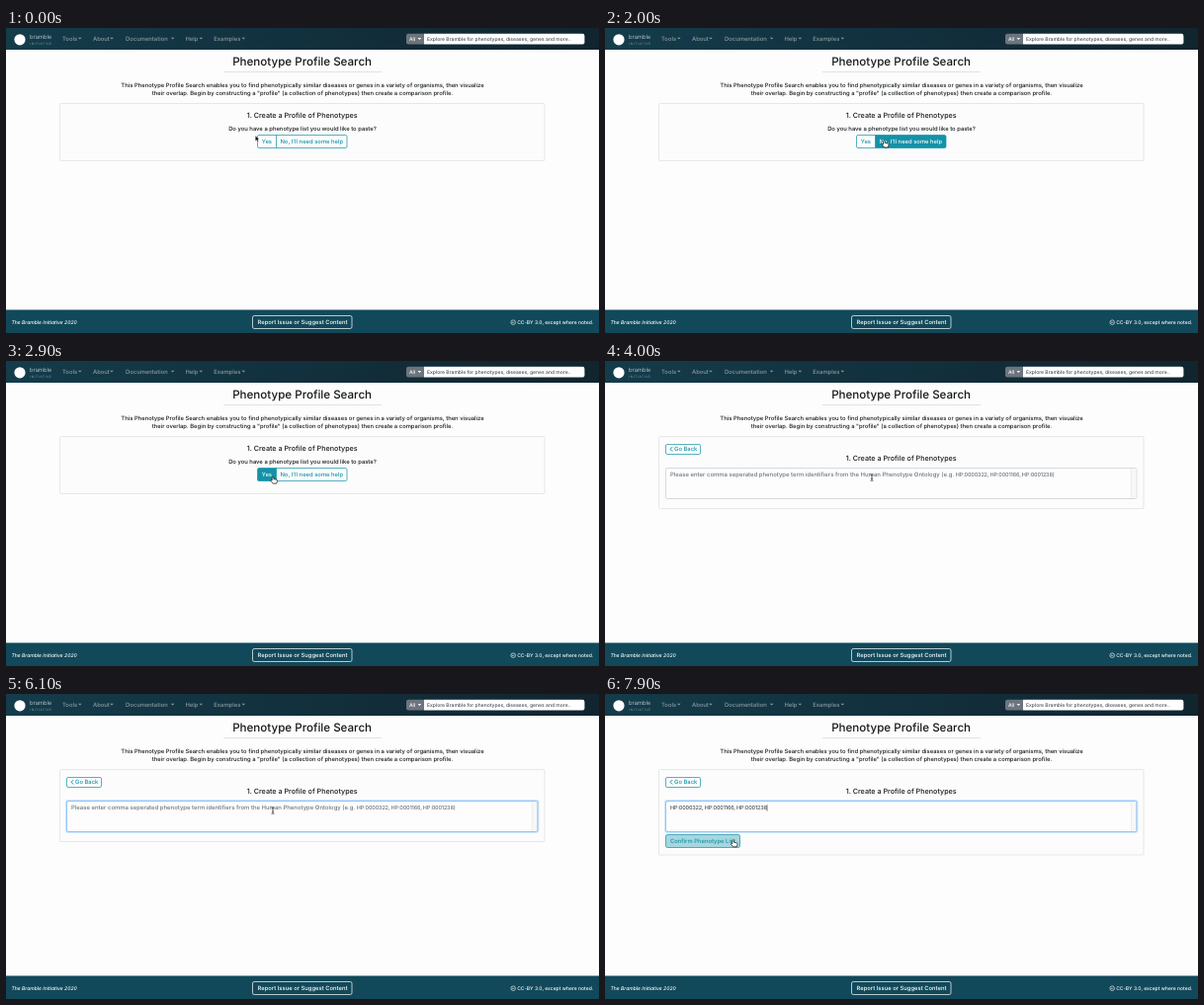
These frames come from a looping animation (600x309 px, 8000 ms). An HTML page:

```html
<!DOCTYPE html>
<html lang="en">
<head>
<meta charset="utf-8">
<title>Phenotype Profile Search</title>
<style>
  html, body { margin: 0; width: 100%; height: 100%; overflow: hidden; background: #fdfdfd; }
  svg { display: block; width: 100%; height: 100%; }
  text { font: 500 5.86px Inter, "Open Sans", sans-serif; fill: #15181b; white-space: pre; text-rendering: geometricPrecision; }
  .mid { text-anchor: middle; }
  .title { font-size: 11.6px; }
  .head { font-size: 7.2px; }
  .nav text { fill: #8b9ba2; }
  .small { font-size: 5.02px; }
  .white, .nav .white { fill: #fff; }
  .teal { fill: #1392a8; }
  .line { fill: none; stroke: #1392a8; stroke-opacity: .7; }
  .card { fill: #fcfcfc; stroke: #e7e7e8; }
  .ids { font-size: 5.5px; letter-spacing: -.17px; }
  .hint { fill: #6c757d; font-size: 5.96px; }
</style>
</head>
<body>
<svg viewBox="0 0 600 309" preserveAspectRatio="none">
  <defs>
    <linearGradient id="navFill" x2="1" y2="0">
      <stop stop-color="#143c4b"/><stop offset=".5" stop-color="#12303d"/><stop offset="1" stop-color="#11252f"/>
    </linearGradient>
  </defs>
  <rect width="600" height="309" fill="#fdfdfd"/>

  <g class="nav">
    <rect width="600" height="22" fill="url(#navFill)"/>
    <circle cx="14" cy="11.8" r="5.6" fill="#fff"/>
    <text x="24" y="11" style="fill:#dbe2e5;font-weight:300">bramble</text>
    <text x="24.3" y="16.6" style="fill:#6d909b;font-size:3.2px;letter-spacing:.6px">INITIATIVE</text>
    <g id="menu"></g>
    <path d="M423 5.8H407Q405 5.8 405 8V14.5Q405 16.6 407 16.6H423Z" fill="#6c757d"/>
    <path d="M423 5.8H583.5Q585.4 5.8 585.4 8V14.5Q585.4 16.6 583.5 16.6H423Z" fill="#fff"/>
    <text x="408" y="13" class="small white">All</text>
    <path d="M416.6 10.1h3.6l-1.8 1.8z" fill="#fff"/>
    <text x="426" y="13" class="small" style="fill:#495057">Explore Bramble for phenotypes, diseases, genes and more..</text>
  </g>

  <text class="mid title" x="299.6" y="38">Phenotype Profile Search</text>
  <path d="M220 44.5H380" stroke="#dcdcdc" stroke-width=".8"/>
  <text class="mid" x="300" y="59.5">This Phenotype Profile Search enables you to find phenotypically similar diseases or genes in a variety of organisms, then visualize</text>
  <text class="mid" x="300" y="68.1">their overlap. Begin by constructing a "profile" (a collection of phenotypes) then create a comparison profile.</text>

  <rect id="card" class="card" x="54.5" y="76.5" width="490.5" height="58" rx="1"/>
  <text id="head" class="mid head" x="299.7" y="90.8">1. Create a Profile of Phenotypes</text>

  <g id="ask">
    <text class="mid" x="300" y="103.7">Do you have a phenotype list you would like to paste?</text>
    <path class="teal" id="yesFill" d="M273.5 108.5H256Q254.5 108.5 254.5 110V120Q254.5 121.5 256 121.5H273.5Z"/>
    <path class="teal" id="noFill" d="M273.5 108.5H343.5Q345 108.5 345 110V120Q345 121.5 343.5 121.5H273.5Z"/>
    <rect class="line" x="254.5" y="108.5" width="90.5" height="13" rx="1.5"/>
    <path class="line" d="M273.5 108.5V121.5"/>
    <text class="mid teal" x="263.9" y="117">Yes</text>
    <text class="mid teal" x="309.3" y="117">No, I'll need some help</text>
    <text class="mid white" id="yesText" x="263.9" y="117">Yes</text>
    <text class="mid white" id="noText" x="309.3" y="117">No, I'll need some help</text>
  </g>

  <g id="form">
    <rect class="line" x="61.5" y="84.5" width="35" height="10" rx="1.4"/>
    <path class="line" d="M68.2 87.1L66 89.3L68.2 91.5" style="stroke-opacity:1"/>
    <text class="teal" x="70" y="91.4">Go Back</text>
    <rect id="ring" x="61" y="108" width="477.4" height="32" rx="2" fill="none" stroke="#cfe5fd" stroke-width="2"/>
    <rect x="61.5" y="108.5" width="476.4" height="31" rx="1.5" fill="#fdfdfd" stroke="#d5d9de"/>
    <path d="M532.4 109H537.4V139H532.4Z" fill="#f7f7f7"/>
    <path d="M532.4 109V139" stroke="#e6e6e6" stroke-width=".7"/>
    <rect id="edge" x="61.5" y="108.5" width="476.4" height="31" rx="1.5" fill="none" stroke="#93c4f6"/>
    <text id="hint" class="hint" x="66" y="117.3">Please enter comma seperated phenotype term identifiers from the Human Phenotype Ontology (e.g. <tspan class="ids">HP:0000322, HP:0001166, HP:0001238)</tspan></text>
    <g id="filled">
      <text class="ids" x="66" y="117.3" style="fill:#495057">HP:0000322, HP:0001166, HP:0001238</text>
      <rect id="confirmFill" class="teal" x="61.5" y="142.5" width="75" height="13" rx="1.7"/>
      <rect class="line" x="61.5" y="142.5" width="75" height="13" rx="1.7"/>
      <text class="teal" x="66" y="151.2">Confirm Phenotype List</text>
    </g>
    <path id="caret" d="M0 112.2V118.6" stroke="#222" stroke-width=".6"/>
  </g>

  <rect y="285.5" width="600" height="23.5" fill="#12495a"/>
  <text class="small white" x="5.5" y="300" style="font-style:italic">The Bramble Initiative 2020</text>
  <rect x="249.5" y="291.5" width="100.5" height="13" rx="1.7" fill="none" stroke="#fff" stroke-opacity=".7"/>
  <text class="mid white" x="300" y="300.1">Report Issue or Suggest Content</text>
  <circle cx="513.2" cy="298.2" r="2.3" fill="none" stroke="#fff" stroke-width=".6"/>
  <text class="mid white" x="513.2" y="299.1" style="font-size:2.4px;font-weight:700">cc</text>
  <text class="small white" x="594.3" y="300" text-anchor="end">CC-BY 3.0, except where noted.</text>

  <g id="mouse">
    <path id="arrow" d="M0 0V5.6L1.3 4.5L2.2 6.6L3.2 6.1L2.3 4.1H4Z" fill="#000" stroke="#fff" stroke-width=".4"/>
    <path id="hand" d="M-.8 .5Q0 -.5 .8 .5V2.4L4 3.1Q4.7 3.4 4.5 4.6L3.8 7H.1L-2.1 4.3Q-2 3.2 -.8 3.9Z" fill="#fff" stroke="#111" stroke-width=".7" stroke-linejoin="round"/>
    <path id="beam" d="M-1.4 -3.2Q0 -3.2 0 -2.4Q0 -3.2 1.4 -3.2M0 -2.4V2.4M-1.4 3.2Q0 3.2 0 2.4Q0 3.2 1.4 3.2M-.8 .9H.8" fill="none" stroke="#222" stroke-width=".7"/>
  </g>
</svg>
<script>
  const LOOP = 8000, STEP = 100;
  const OPEN = 3400, FOCUS = 5600, PASTE = 6400;
  const $ = id => document.getElementById(id);

  // Each track is a list of [time, value, ...].
  const tracks = {
    mouse: [[200, 252.3, 109], [600, 262, 112.5], [700, 262, 112.5], [900, 263, 113], [1400, 263, 113],
            [1700, 272, 112.8], [2000, 282.5, 114], [2200, 282.5, 114.5], [2400, 272, 115],
            [2500, 270, 115], [3100, 270, 118.2], [6900, 270, 118.2], [7300, 205, 132], [7800, 129.5, 147.8]],
    yes: [[300, 0], [500, 1], [1600, 1], [1800, 0], [2300, 0], [2500, 1]],
    no: [[1700, 0], [1900, 1], [2200, 1], [2400, 0]],
    focus: [[5500, 0], [5700, 1]],
    confirm: [[7800, 0], [7900, .36]]
  };

  function at(track, t) {
    const i = track.findIndex(k => k[0] >= t);
    if (i < 0) return track[track.length - 1].slice(1);
    if (i === 0) return track[0].slice(1);
    const a = track[i - 1], b = track[i], p = (t - a[0]) / (b[0] - a[0]);
    return a.slice(1).map((v, n) => v + (b[n + 1] - v) * p);
  }

  const show = (id, on) => { $(id).style.display = on ? '' : 'none'; };
  const fade = (id, v) => { $(id).style.opacity = v; };

  function pointer(t, x, y) {
    if (t < 500) return 'arrow';
    if (t < OPEN) return 'hand';
    if (y < 139.5) return 'beam';
    return x > 137 ? 'arrow' : 'hand';
  }

  function draw(t) {
    const [x, y] = at(tracks.mouse, t);
    const open = t >= OPEN, pasted = t >= PASTE;
    show('ask', !open);
    show('form', open);
    $('head').setAttribute('y', open ? 101.3 : 90.8);
    $('card').setAttribute('height', pasted ? 86.5 : open ? 73 : 58);

    for (const name of ['yes', 'no']) {
      const [v] = at(tracks[name], t);
      fade(name + 'Fill', v);
      fade(name + 'Text', v);
    }
    const [focus] = at(tracks.focus, t);
    fade('ring', focus);
    fade('edge', focus);
    fade('confirmFill', at(tracks.confirm, t)[0]);
    show('hint', !pasted);
    show('filled', pasted);

    const blink = (t >= FOCUS && t < 6100) || (pasted && (t < 7000 || t >= 7500));
    show('caret', blink);
    $('caret').setAttribute('transform', `translate(${pasted ? 164 : 66} 0)`);

    const shape = pointer(t, x, y);
    for (const id of ['arrow', 'hand', 'beam']) show(id, id === shape);
    $('mouse').setAttribute('transform', `translate(${x} ${y})`);
  }

  const menu = [['Tools', 57, 73], ['About', 88, 105.2], ['Documentation', 121, 166.8], ['Help', 181.5, 195.5], ['Examples', 210.3, 238.5]];
  $('menu').innerHTML = menu.map(([label, x, c]) =>
    `<text x="${x}" y="13">${label}</text><path d="M${c} 9.8h3.6l-1.8 1.8z" fill="#8b9ba2"/>`).join('');

  const start = performance.now();
  function tick() {
    const t = (performance.now() - start) % LOOP;
    draw(Math.floor(t / STEP) * STEP);
    requestAnimationFrame(tick);
  }
  tick();
</script>
</body>
</html>
```
